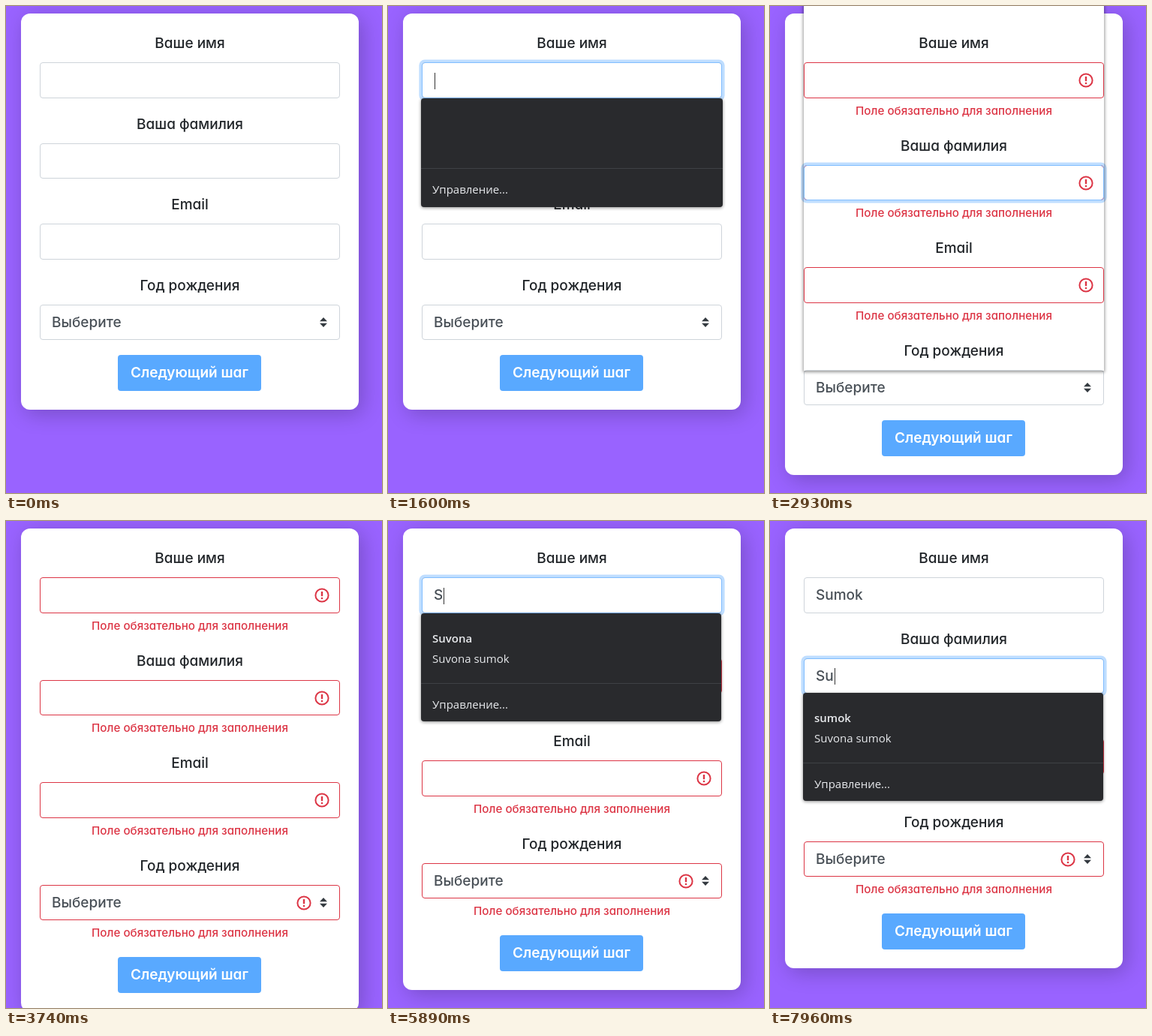
An HTML page for the animation above (8000 ms loop, 501x649 px).

```html
<!DOCTYPE html>
<html lang="ru">
<head>
<meta charset="utf-8">
<title>Форма</title>
<style>
  html, body { margin: 0; width: 100%; height: 100%; overflow: hidden; background: #9963ff; }
  #stage {
    position: relative; width: 501px; height: 649px; overflow: hidden;
    font: 500 19px/24px Inter, "Open Sans", sans-serif;
    font-feature-settings: "cv11"; color: #212529; background: #9963ff;
  }
  #stage div, #stage svg { position: absolute; box-sizing: border-box; }
  #card {
    left: 20px; top: 10px; width: 450px; background: #fff; border-radius: 12px;
    box-shadow: 5px 6px 28px rgba(0, 0, 0, .22);
  }
  .field { left: 45px; width: 400px; height: 47.6px; }
  .label { left: 0; width: 100%; top: -37px; text-align: center; }
  .box {
    inset: 0; padding-left: 15px; line-height: 45px; white-space: pre;
    border: 1px solid #ced4da; border-radius: 4px; background: #fff; color: #495057;
  }
  .bad .box { border-color: #dc3545; }
  .ring {
    inset: 0; border: 1px solid #80bdff; border-radius: 4px;
    box-shadow: 0 0 0 3.6px rgba(0, 123, 255, .25);
  }
  .caret {
    display: inline-block; width: 1px; height: 22px; margin-left: 1px;
    vertical-align: middle; background: #333;
  }
  .icon { width: 20px; height: 20px; left: 366px; top: 14px; }
  .select .icon { left: 342px; }
  .arrows { width: 10px; height: 13px; left: 373px; top: 17px; }
  .note {
    left: 0; width: 100%; top: 52.5px; text-align: center;
    font-size: 15.2px; color: #dc3545;
  }
  #next {
    left: 149px; width: 191px; height: 47.6px; border-radius: 4px;
    background: #59a9ff; color: #fff; text-align: center; font-weight: 600; line-height: 47px;
  }
  #pop {
    left: 44px; border-radius: 4px; background: #292a2d; color: #e8eaed;
    box-shadow: 0 1px 4px rgba(0, 0, 0, .45);
    font: 15px/20px "Open Sans", "Noto Sans", sans-serif; font-feature-settings: normal;
  }
  #pop div { left: 15px; white-space: pre; }
  #pop .main { top: 23px; font-weight: 600; }
  #pop .sub { top: 50px; }
  #pop .line { left: 0; right: 0; top: 93px; height: 1px; background: #3f4145; }
  #pop .manage { top: 111px; }
  #list { left: 45px; top: -6px; width: 400px; height: 492px; box-shadow: 0 1px 4px 1px rgba(0, 0, 0, .4); }
  #list .top { left: 0; top: 0; width: 100%; height: 18px; background: #fff; }
  #list .sheet { inset: 0; background: #fff; }
</style>
</head>
<body>
<div id="stage">
  <div id="card"></div>
  <div id="next">Следующий шаг</div>
</div>
<script>
const LOOP = 8000, TOP = 75, PITCH = 107.6, NOTE = 28.9;
const stage = document.getElementById('stage');
const card = document.getElementById('card');
const next = document.getElementById('next');

function add(parent, cls, html = '') {
  const el = document.createElement('div');
  el.className = cls;
  el.innerHTML = html;
  parent.append(el);
  return el;
}

const ICON = `<svg class="icon" viewBox="0 0 20 20" fill="none" stroke="#dc3545" stroke-width="2">
  <circle cx="10" cy="10" r="8.6"/><path d="M10 5v6.2" stroke-width="2.4"/>
  <circle cx="10" cy="14" r="1.3" fill="#dc3545" stroke="none"/></svg>`;
const ARROWS = `<svg class="arrows" viewBox="0 0 4 5" preserveAspectRatio="none">
  <path fill="#343a40" d="M2 0L0 2h4zm0 5L0 3h4z"/></svg>`;

const fields = ['Ваше имя', 'Ваша фамилия', 'Email', 'Год рождения'].map((name, i) => {
  const root = add(stage, i === 3 ? 'field select' : 'field');
  add(root, 'label', name);
  const box = add(root, 'box', '<span></span><i class="caret"></i>');
  const ring = add(root, 'ring');
  const error = add(root, '', ICON);
  error.style.inset = '0';
  add(error, 'note', 'Поле обязательно для заполнения');
  if (i === 3) root.insertAdjacentHTML('beforeend', ARROWS);
  return { root, ring, error, text: box.firstChild, caret: box.lastChild };
});

const pop = add(stage, '');
pop.id = 'pop';
const popMain = add(pop, 'main'), popSub = add(pop, 'sub');
add(pop, 'line');
add(pop, 'manage', 'Управление...');

const list = add(stage, '');
list.id = 'list';
add(list, 'top');
const sheet = add(list, 'sheet');

// err: 0 = none, 1 = shown, 2 = only its space is reserved
const steps = [
  [0, { err: [0, 0, 0, 0], first: '', last: '', caret: -1, pop: -1, rows: ['', ''], slip: 0, list: 0 }],
  [1330, { caret: 0 }],
  [1410, { pop: 0 }],
  [1850, { err: [1, 0, 0, 0], caret: 1, pop: -1 }],
  [1950, { pop: 1 }],
  [2210, { err: [1, 2, 0, 0], slip: NOTE }],
  [2370, { err: [1, 1, 0, 0], caret: 2, pop: 2, slip: 0 }],
  [2930, { err: [1, 1, 1, 0], caret: -1, pop: -1, list: 1 }],
  [3580, { err: [1, 1, 1, 1], list: 0 }],
  [5190, { caret: 0, pop: 0 }],
  [5730, { err: [0, 1, 1, 1], first: 'S', rows: ['Suvona', 'Suvona sumok'] }],
  [6260, { first: 'Su' }],
  [6550, { first: 'Sum', pop: -1 }],
  [6660, { first: 'Sumo' }],
  [6770, { first: 'Sumok' }],
  [6950, { caret: 1 }],
  [7590, { err: [0, 0, 1, 1], last: 'S', pop: 1, rows: ['sumok', 'Suvona sumok'] }],
  [7880, { last: 'Su' }]
];

// field, start, end, fade-in time
const focus = [
  [0, 1330, 1850, 150], [1, 1850, 2210, 150], [2, 2210, 2930, 80],
  [1, 2930, 3580, 1], [0, 5350, 6950, 80], [1, 6950, LOOP, 150]
];

const clamp = v => Math.max(0, Math.min(1, v));
const show = (el, on) => { el.style.visibility = on ? 'visible' : 'hidden'; };

function glow(i, t) {
  const span = focus.find(([f, a, b]) => f === i && t >= a && t < b);
  return span ? clamp((t - span[1] + 1) / span[3]) : 0;
}

function render(t) {
  const s = Object.assign({}, ...steps.filter(([at]) => at <= t).map(([, change]) => change));
  const values = [s.first, s.last, '', 'Выберите'];
  let y = TOP, popY = 0;
  fields.forEach((f, i) => {
    const bad = s.err[i] === 1;
    f.root.style.top = y + 'px';
    f.root.classList.toggle('bad', bad);
    show(f.error, bad);
    f.text.textContent = values[i];
    show(f.caret, s.caret === i);
    f.ring.style.opacity = glow(i, t);
    f.ring.style.transform = i === 2 ? `translateY(${-s.slip}px)` : '';
    if (s.pop === i) popY = Math.floor(y + 48);
    y += PITCH + (s.err[i] ? NOTE : 0);
  });
  const buttonY = y - PITCH + 67.6;
  next.style.top = buttonY + 'px';
  card.style.height = buttonY + 62.6 + 'px';

  const filled = s.rows[0] !== '';
  show(pop, s.pop >= 0);
  pop.style.top = (s.pop ? popY - 1 : popY) + 'px';
  pop.style.width = (filled ? 400 : 402) + 'px';
  pop.style.height = (filled ? 144 : 145) + 'px';
  popMain.textContent = s.rows[0];
  popSub.textContent = s.rows[1];

  show(list, s.list);
  sheet.style.opacity = clamp((t - 2980) / 120);
}

const start = performance.now();
function tick() {
  render((performance.now() - start) % LOOP);
  requestAnimationFrame(tick);
}
tick();
</script>
</body>
</html>
```
